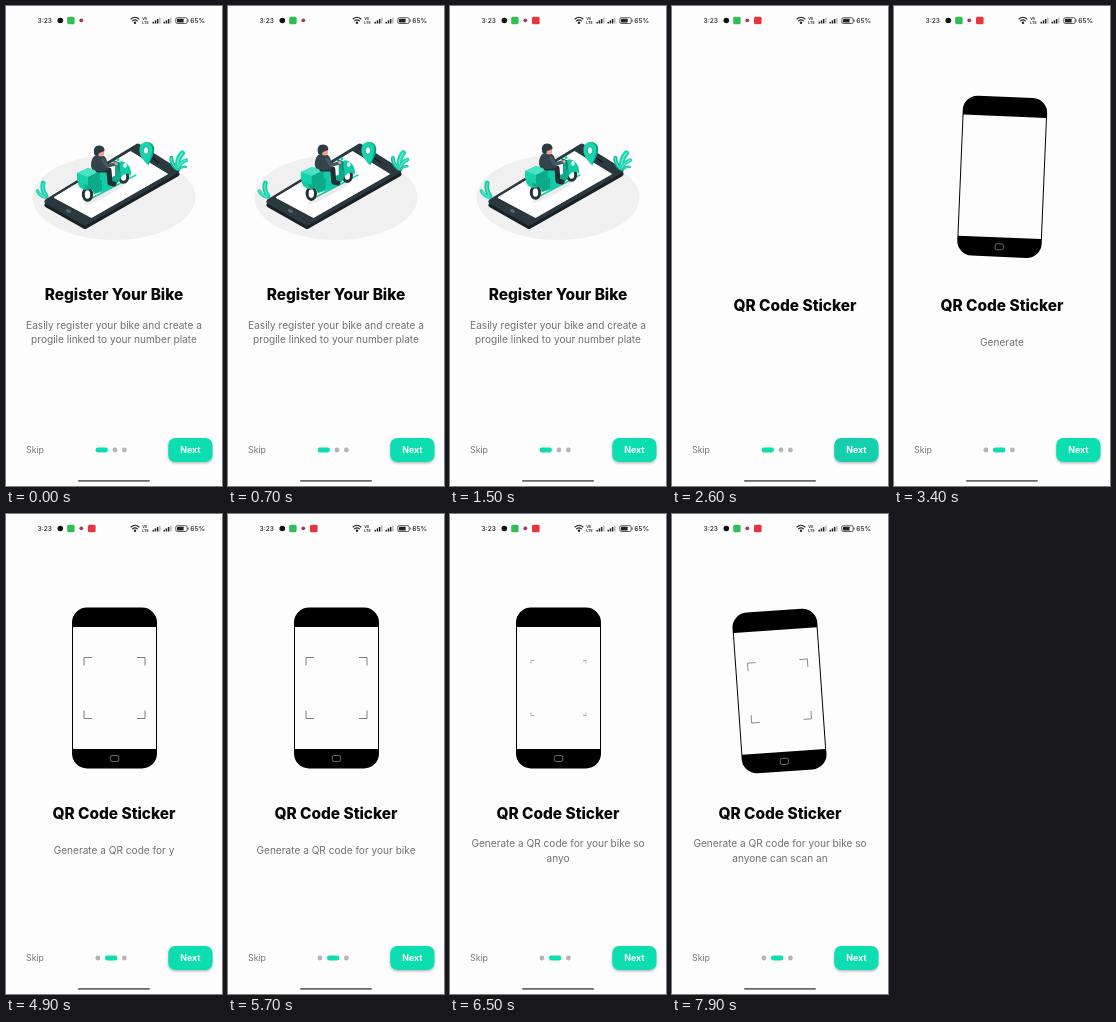
An HTML page that plays this animation: 216 by 480 pixels, repeating every 8000 ms.

```html
<!DOCTYPE html>
<html lang="en">
<head>
<meta charset="utf-8">
<title>Onboarding</title>
<style>
  html, body { margin: 0; width: 100%; height: 100%; overflow: hidden; background: #fdfdfd; }
  svg { display: block; width: 100vw; height: 100vh; font-family: Inter, "Noto Sans", sans-serif; }
  .title { font-size: 15.4px; font-weight: 800; fill: #080808; text-anchor: middle; }
  .body { font-size: 10.1px; fill: #707070; text-anchor: middle; }
  .status { font-size: 6.7px; font-weight: 500; fill: #222; }
  .line { fill: none; stroke-linecap: round; stroke-linejoin: round; }
</style>
</head>
<body>
<svg viewBox="0 0 216 480">
  <defs>
    <filter id="shadow" x="-20%" y="-20%" width="140%" height="160%">
      <feDropShadow dx="0" dy="1.3" stdDeviation="1.1" flood-color="#000" flood-opacity=".28"/>
    </filter>
    <g id="leaf" class="line">
      <path d="M0 0Q-4-7-1-14" stroke-width="5"/>
      <path d="M0 0Q-4-7-1-14" stroke="#8ff0dc" stroke-width=".9"/>
    </g>
  </defs>
  <rect width="216" height="480" fill="#fdfdfd"/>

  <g id="statusBar">
    <text class="status" x="31.5" y="16.9">3:23</text>
    <circle cx="54.3" cy="14.5" r="2.8" fill="#111"/>
    <rect x="61.2" y="10.8" width="7.4" height="7.4" rx="1.5" fill="#2fbf55"/>
    <circle cx="75.3" cy="14.3" r="1.9" fill="#a63662"/>
    <rect id="alert" x="-3.8" y="-3.8" width="7.6" height="7.6" rx="1.5" fill="#e8343f"/>
    <path class="line" stroke="#222" stroke-width="1.1" d="M125 13Q129 9.6 133 13M126.6 14.9Q129 12.8 131.4 14.9"/>
    <circle cx="129" cy="16.7" r="1.2" fill="#222"/>
    <g font-size="3.7" font-weight="700" fill="#333">
      <text x="136.2" y="14">Vo</text><text x="136.2" y="17.8">LTE</text>
    </g>
    <g id="signals" fill="#222"></g>
    <rect x="169.8" y="11.7" width="11.4" height="5.8" rx="1.5" fill="none" stroke="#333" stroke-width=".8"/>
    <rect x="171" y="12.7" width="6.6" height="3.8" rx=".5" fill="#222"/>
    <path d="M182.2 13.5v2.2" stroke="#333" stroke-width=".8"/>
    <text class="status" x="184.2" y="16.9">65%</text>
  </g>

  <g id="firstPage">
    <ellipse cx="108" cy="191.5" rx="81.5" ry="42.5" fill="#f0f0f0"/>
    <g id="leftPlant"></g>
    <g stroke-linejoin="round" stroke-width="5">
      <path d="M41 199L132 143.500L171 168L79 220.500Z" fill="#172126" stroke="#172126"/>
      <path d="M41 195.500L132 140L171 164.500L79 217Z" fill="#2b383e" stroke="#2b383e"/>
    </g>
    <path d="M48 191.500L124.500 145.500L161.500 168L85.500 211.500Z" fill="#fff" stroke="#fff" stroke-linejoin="round"/>
    <ellipse cx="62.500" cy="205" rx="2.8" ry="1.6" fill="#55656c" transform="rotate(28 62.500 205)"/>
    <path class="line" d="M146 152L152 156" stroke="#0f181c" stroke-width="1.5"/>
    <path class="line" d="M86 192L130 169" stroke="#19d9b2" stroke-width="1.5"/>
    <g id="rightPlant"></g>
    <path d="M142.500 159C138 154 133.500 149 134 143C135 135 145 133 148 141C149.500 147 145 153 142.500 159Z" fill="#0b9f82"/>
    <path d="M141.500 159C137 154 133 149 133.500 143C134 134.500 144 134 146 141C147 148 144 153 141.500 159Z" fill="#17d5af"/>
    <ellipse cx="140" cy="144.500" rx="2.7" ry="3.8" fill="#e8fffa" stroke="#0b9f82" stroke-width=".8"/>
    <g id="scooter">
      <ellipse cx="100" cy="187" rx="25" ry="3" fill="#000" opacity=".08" transform="rotate(-28 100 187)"/>
      <g fill="#fff" stroke="#263238" stroke-width="3">
        <ellipse cx="81.500" cy="188.500" rx="4.2" ry="5.8"/>
        <ellipse cx="117.500" cy="170.500" rx="4.2" ry="5.800"/>
      </g>
      <path d="M72 177Q72 169 79 167L98 162L106 171L109 170L109 158Q115 153 120 157Q126 161 125 170Q121 165 115 171Q111 181 99 185L88 188Q86 179 79 184Q72 182 72 177Z" fill="#13cba6"/>
      <path d="M78 180Q84 173 96 174L96 184L88 188Q86 180 81 185Z" fill="#0baa8a"/>
      <path d="M109 158Q115 159 115 171Q113 177 108 179L106 171L109 170Z" fill="#0da98a"/>
      <path d="M71 167L82 162L94 165V174L82 180L71 175Z" fill="#16d3ad"/>
      <path d="M71 167L82 162L94 165L82 171Z" fill="#48e3c4"/>
      <path d="M82 171V180L94 174V165Z" fill="#0da98a"/>
      <path class="line" d="M113 164L112.500 157L108 155" stroke="#087d67" stroke-width="1.7"/>
      <ellipse cx="119" cy="159.500" rx="1.8" ry="2.4" fill="#dffff7"/>
      <circle cx="112" cy="153.500" r="1.500" fill="#14cfaa"/>
      <path class="line" d="M92 164L103 164L104 177L108 178" stroke="#222e34" stroke-width="5"/>
      <path d="M85 160Q85 150 91 149L98 150Q102 153 102 164Q92 167 86 163Z" fill="#34434b"/>
      <path class="line" d="M97 154L101 160L109 158" stroke="#465760" stroke-width="3.500"/>
      <circle cx="110" cy="157.500" r="1.500" fill="#e9a28c"/>
      <path d="M92 145H98V149Q95 152 92 149Z" fill="#e9a28c"/>
      <path d="M88 147Q87 139 93.500 139.500Q99 140 98.500 145L93 147L92 150Q88 150 88 147Z" fill="#2c3b42"/>
    </g>
    <text class="title" x="108" y="294">Register Your Bike</text>
    <text class="body" x="108" y="322.700">Easily register your bike and create a</text>
    <text class="body" x="108" y="337.300">progile linked to your number plate</text>
  </g>

  <g id="phone">
    <rect x="-42.500" y="-80.500" width="85" height="161" rx="15"/>
    <rect x="-41.500" y="-61" width="83" height="122" fill="#fdfdfd"/>
    <rect x="-4.200" y="67.500" width="8.400" height="6" rx="1.800" fill="none" stroke="#999" stroke-width=".7"/>
    <path id="brackets" fill="none" stroke-width=".9"/>
  </g>
  <text id="secondTitle" class="title" y="304.600">QR Code Sticker</text>
  <text id="typedTop" class="body" x="108"></text>
  <text id="typedBottom" class="body" x="108" y="347.700"></text>

  <text x="20" y="447" font-size="8.800" fill="#777">Skip</text>
  <g id="dots"></g>
  <rect id="button" x="162.200" y="432" width="44.300" height="24" rx="7" filter="url(#shadow)"/>
  <text x="184.400" y="447" font-size="8.800" font-weight="700" fill="#fff" text-anchor="middle">Next</text>
  <rect x="72" y="474" width="72" height="1.700" rx=".85" fill="#686868"/>
</svg>
<script>
const LOOP = 8000, STEP = 100;
const TEAL = "#0cdeb2", GREY = "#b4b4b4";
const MESSAGE = "Generate a QR code for your bike so anyone can scan an";
const ONE_LINE_MAX = 37, WRAP_AT = 36;

const $ = id => document.getElementById(id);
const set = (node, attrs) => {
  for (const key in attrs) node.setAttribute(key, attrs[key]);
  return node;
};
const add = (parent, tag, attrs) =>
  parent.appendChild(set(document.createElementNS("http://www.w3.org/2000/svg", tag), attrs));
const clamp = v => Math.min(1, Math.max(0, v));
const ramp = (t, from, to) => {
  const p = clamp((t - from) / (to - from));
  return p * p * (3 - 2 * p);
};
const mix = (a, b, p) => a + (b - a) * p;

// Rows are [time, ...values]; values ease between neighbouring rows.
function pose(keys, t) {
  const i = keys.findIndex(key => key[0] > t);
  if (i === 0) return keys[0].slice(1);
  if (i < 0) return keys[keys.length - 1].slice(1);
  const [a, b] = [keys[i - 1], keys[i]], p = ramp(t, a[0], b[0]);
  return a.slice(1).map((v, j) => mix(v, b[j + 1], p));
}

// Angle, centre x, centre y, scale
const PHONE = [
  [2900, -7, 106, 172, 1], [3300, 4, 109, 170, 1], [3650, -4, 105, 174, .97],
  [3900, -2, 106.2, 176, .965], [4300, 0, 108.5, 174, 1], [7700, 0, 108.5, 174, 1],
  [7900, -4, 107.5, 177, 1], [8000, -5, 107, 177, 1]
];
// Half size, arm length, grey level, opacity
const BRACKETS = [
  [4000, 26, 3, 170, 0], [4300, 30.5, 8, 110, 1], [6100, 30.5, 8, 110, 1],
  [6500, 27.5, 3, 165, 1], [7000, 30.5, 8, 110, 1], [7900, 30, 8, 130, 1]
];

for (const x of [146.5, 157.5])
  for (let i = 0; i < 4; i++)
    add($("signals"), "rect", { x: x + i * 2.2, y: 15.8 - i * 1.4, width: 1.5, height: 1.7 + i * 1.4, opacity: i > 2 ? .3 : 1 });

// Leaf rows: x, y, angle, scale, colour
function plant(group, rows) {
  return rows.map(([x, y, angle, scale, stroke]) => {
    const node = add(group, "use", { href: "#leaf", stroke });
    return sway => set(node, { transform: `translate(${x} ${y}) rotate(${angle + sway}) scale(${scale})` });
  });
}
const leaves = [
  ...plant($("leftPlant"), [
    [40, 190, -8, .95, "#14cda8"], [39, 191, -48, .7, "#22d6b2"]]),
  ...plant($("rightPlant"), [
    [170, 162, -22, .8, "#12bd9b"], [172, 162, 18, 1.1, "#1ad6b0"],
    [172, 162, 48, .8, "#22d6b2"], [173, 163, 74, .5, "#12bd9b"]])
];

const dots = [0, 1, 2].map(() => add($("dots"), "rect", { y: 441.6, height: 4.8, rx: 2.4 }));

function drawDots(t) {
  const p = ramp(t, 2700, 3100);
  const active = [1 - p, p, 0];
  let x = 89.5;
  dots.forEach((dot, i) => {
    const width = mix(4.8, 12.5, active[i]);
    set(dot, { x, width, fill: active[i] > .5 ? TEAL : GREY });
    x += width + 4.6;
  });
}

function drawFirstPage(t) {
  set($("firstPage"), { opacity: t < 2400 ? 1 : t < 2500 ? .4 : 0 });
  const drive = 2 - 2 * Math.cos(t / 3000 * Math.PI * 2);
  set($("scooter"), { transform: `translate(${drive} ${-drive / 2})` });
  leaves.forEach((draw, i) => draw(3 * Math.sin(t / 750 * Math.PI + i * .3)));
}

function drawPhone(t) {
  const [angle, x, y, scale] = pose(PHONE, t);
  set($("phone"), {
    opacity: clamp((t - 2800) / 300),
    transform: `translate(${x} ${y}) rotate(${angle}) scale(${scale})`
  });
  const [half, arm, level, opacity] = pose(BRACKETS, t);
  const corner = (sx, sy) =>
    `M${sx * (half - arm)} ${sy * half}H${sx * half}V${sy * (half - arm)}`;
  set($("brackets"), {
    d: corner(-1, -1) + corner(1, -1) + corner(1, 1) + corner(-1, 1),
    stroke: `rgb(${level},${level},${level})`, opacity
  });
}

function drawCopy(t) {
  set($("secondTitle"), {
    opacity: t < 2500 ? 0 : t < 2600 ? .6 : 1,
    x: t < 2600 ? 143 : t < 2900 ? 123 : 108
  });
  const count = t < 2900 ? 0 : Math.floor((t - 2500) / 100);
  const text = MESSAGE.slice(0, count), wrapped = count > ONE_LINE_MAX;
  $("typedTop").textContent = wrapped ? text.slice(0, WRAP_AT).trim() : text.trim();
  $("typedBottom").textContent = wrapped ? text.slice(WRAP_AT) : "";
  set($("typedTop"), { y: wrapped ? 333.2 : 340.4 });
}

function render(time) {
  let t = Math.floor(time % LOOP / STEP) * STEP;
  // The picture rests twice around the page change.
  if (t === 2300) t = 2200;
  if (t > 2600 && t < 2900) t = 2600;
  drawFirstPage(t);
  drawPhone(t);
  drawCopy(t);
  drawDots(t);
  set($("alert"), { transform: `translate(85.8 14.5) scale(${ramp(t, 700, 1100)})` });
  set($("button"), { fill: t >= 2400 && t < 2900 ? "#18d0ad" : TEAL });
}

const start = performance.now();
function tick() {
  render(performance.now() - start);
  requestAnimationFrame(tick);
}
tick();
</script>
</body>
</html>
```
